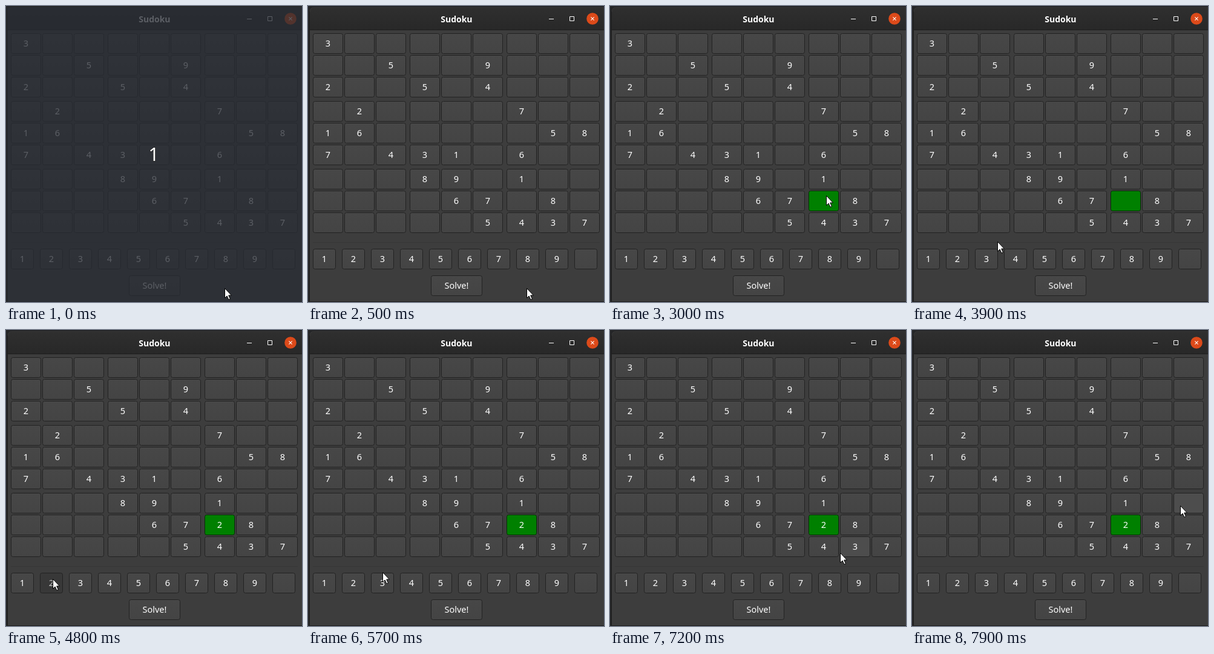
An HTML page for the animation above (8 s loop, 489x489 px).

```html
<!DOCTYPE html>
<html lang="en">
<head>
<meta charset="utf-8">
<title>Sudoku</title>
<style>
html, body { margin: 0; width: 100%; height: 100%; overflow: hidden; background: #242527; }
svg { display: block; width: 100%; height: 100%; }
text { font: 14.5px "Noto Sans", "Open Sans", sans-serif; fill: #fff; text-anchor: middle; }
.title { font-size: 14px; font-weight: 700; }
.count { font-size: 31px; stroke: #222; stroke-width: 1.5px; paint-order: stroke; }
</style>
</head>
<body>
<svg viewBox="0 0 489 489">
  <defs>
    <linearGradient id="bar" x2="0" y2="1"><stop stop-color="#2f2f2f"/><stop offset="1" stop-color="#282828"/></linearGradient>
    <linearGradient id="face" x2="0" y2="1"><stop stop-color="#474747"/><stop offset="1" stop-color="#444"/></linearGradient>
  </defs>
  <path d="M3 488V9Q3 2 10 2H489V488Z" fill="#3d3d3d"/>
  <path d="M3 40V9Q3 2 10 2H489V40Z" fill="url(#bar)"/>
  <path d="M3.5 10Q3.5 2.5 10 2.5H489" fill="none" stroke="#363636"/>
  <path d="M3 39.5H489" stroke="#1d1d1d"/>
  <path d="M2.5 9V488.5H489" fill="none" stroke="#1c1c1c"/>
  <path d="M8 390.5H482" stroke="#373737"/>
  <text class="title" x="245.4" y="27">Sudoku</text>
  <path d="M398 21.5H406M432.5 17.5H439.5V24.5H432.5Z" fill="none" stroke="#fff"/>
  <circle cx="470" cy="21" r="9.8" fill="#dc4a1a"/>
  <path d="M467.4 18.4L472.6 23.6M472.6 18.4L467.4 23.6" stroke="#fff" stroke-width="1.1"/>
  <g id="board"></g>
  <g id="dim">
    <rect x="2" y="2" width="487" height="487" fill="#282c34" opacity=".76"/>
    <text class="count" x="244" y="255.5">1</text>
  </g>
  <path id="cursor" d="M.5 .5V16.4L4.1 13L6.9 19.2L9.4 18.1L6.7 12H11.4Z" fill="#fff" stroke="#000" stroke-linejoin="round"/>
</svg>
<script>
const LOOP = 8000, STEP = 100;
const $ = id => document.getElementById(id);
const board = $('board');

const puzzle = '3........ ..5..9... 2..5.4... .2....7.. 16.....58 7.431.6.. ...89.1.. ....67.8. .....5437';

// Pointer gestures; bow bends the path to the left of its direction
const home = { x: 361, y: 466 };
const moves = [
  { from: 1000, to: 1400, x: 357, y: 317, bow: 6 },
  { from: 1600, to: 1700, x: 357, y: 313, bow: 0 },
  { from: 3100, to: 4200, x: 77, y: 411, bow: 0 },
  { from: 5500, to: 6300, x: 308, y: 391, bow: 12 },
  { from: 6600, to: 6900, x: 367, y: 384, bow: 0 },
  { from: 7000, to: 7900, x: 443, y: 290, bow: 0 }
];

const clamp = v => Math.min(1, Math.max(0, v));
const ease = k => (k + k * k * (3 - 2 * k)) / 2;

function add(tag, attrs) {
  const el = document.createElementNS('http://www.w3.org/2000/svg', tag);
  for (const k in attrs) el.setAttribute(k, attrs[k]);
  return board.appendChild(el);
}

function button(x, y, w, label) {
  const rect = add('rect', { x: x + .5, y: y + .5, width: w - 1, height: 33, rx: 3, stroke: '#222' });
  const text = add('text', { x: x + w / 2, y: y + 22 });
  text.textContent = label;
  return { x, y, w, rect, text };
}

// Every third row and column is followed by a wider gap
const offset = (i, pitch) => i * pitch + Math.floor(i / 3) * 4;

const cells = puzzle.split(' ').flatMap((row, r) => [...row].map((ch, c) =>
  button(8 + offset(c, 52), 45 + offset(r, 36), 50, ch.replace('.', ''))));
const pad = Array.from({ length: 10 }, (_, i) => button(8 + i * 48, 401, 38, i < 9 ? i + 1 : ''));
const buttons = [...cells, ...pad, button(203, 445, 85, 'Solve!')];
const picked = cells[7 * 9 + 6], two = pad[1];

function cursorAt(t) {
  let { x, y } = home;
  for (const m of moves) {
    const k = ease(clamp((t - m.from) / (m.to - m.from)));
    const dx = m.x - x, dy = m.y - y;
    const bend = m.bow * Math.sin(Math.PI * k) / Math.hypot(dx, dy);
    x += dx * k + dy * bend;
    y += dy * k - dx * bend;
    if (k < 1) break;
  }
  return [Math.round(x), Math.round(y)];
}

function fillOf(b, t, x, y) {
  if (b === picked && t >= 3000) return '#008000';
  if (b === picked && t >= 2400 || b === two && t >= 4600 && t < 5600) return '#383838';
  const over = x >= b.x && x < b.x + b.w && y >= b.y && y < b.y + 34;
  return over && b !== two ? '#4d4d4d' : 'url(#face)';
}

function render(time) {
  const t = Math.floor(time % LOOP / STEP) * STEP;
  const [x, y] = cursorAt(t);
  $('cursor').setAttribute('transform', `translate(${x} ${y})`);
  $('dim').style.display = t < 500 ? '' : 'none';
  for (const b of buttons) b.rect.setAttribute('fill', fillOf(b, t, x, y));
  picked.rect.setAttribute('stroke', t >= 3000 ? '#003000' : '#222');
  two.text.style.fill = t >= 4600 && t < 5600 ? '#c4c4c4' : '#fff';
  picked.text.textContent = t >= 4700 ? '2' : '';
}

function frame(now) {
  render(now);
  requestAnimationFrame(frame);
}
render(0);
requestAnimationFrame(frame);
</script>
</body>
</html>
```
